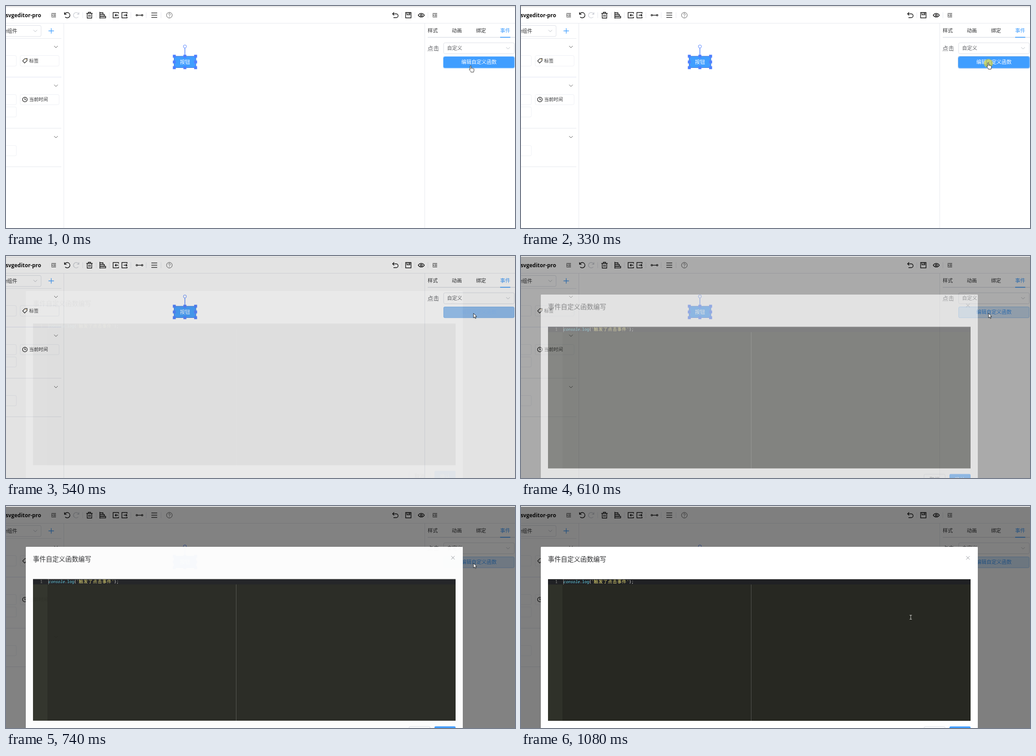
An HTML page for the animation above (1.85 s loop, 1131 by 495 pixels).

```html
<!DOCTYPE html>
<html lang="zh-CN">
<head>
<meta charset="utf-8">
<title>事件自定义函数编写</title>
<style>
html, body { margin: 0; width: 100%; height: 100%; overflow: hidden; background: #fff; }
svg { display: block; width: 1131px; height: 495px; }
text { font: 11.2px "Noto Sans CJK SC", "Noto Sans CJK", sans-serif; fill: #303133; white-space: pre; }
.small { font-size: 10.4px; }
.label { font-size: 12.8px; fill: #606266; }
.brand { font: bold 11.8px "Open Sans", sans-serif; fill: #111; }
.title { font-size: 14.4px; }
.mid { text-anchor: middle; }
.code { font: 8.7px "Noto Sans Mono", "DejaVu Sans Mono", monospace; fill: #f8f8f2; }
.code .fn { fill: #66d9ef; }
.code .str { fill: #e6db74; }
.code .cjk { font: 9.6px "Noto Sans CJK SC", "Noto Sans CJK", sans-serif; letter-spacing: .83px; }
.line { fill: none; stroke: #e6e8ee; }
.icon { fill: none; stroke: #111; stroke-width: 1.4; }
.thin { stroke: #555; stroke-width: 1; }
.pale { stroke: #c0c4cc; }

/* every change is a hard step */
.dialog, .panel, .btn, .btn-text, .ring, .click, .hand, .arrow, .beam {
  animation: 1850ms step-end infinite;
}
.dialog { animation-name: fade; }
.panel { animation-name: drop; }
.btn { fill: #409eff; stroke: #409eff; animation-name: btn; }
.btn-text { fill: #fff; animation-name: btn-text; }
.ring { fill: none; animation-name: ring; }
.click { animation-name: click; }
.hand { animation-name: hand; }
.arrow { animation-name: arrow; }
.beam { animation-name: beam; }

@keyframes fade {
  0% { opacity: 0; }
  29.189% { opacity: .22; }
  32.973% { opacity: .67; }
  36.216% { opacity: .9; }
  40% { opacity: .983; }
  43.784%, 100% { opacity: 1; }
}
@keyframes drop {
  0% { opacity: 0; transform: translateY(-16px); }
  29.189% { opacity: .22; transform: translateY(-12.5px); }
  32.973% { opacity: .66; transform: translateY(-5.4px); }
  36.216% { opacity: .9; transform: translateY(-1.6px); }
  40% { opacity: .983; transform: translateY(-.3px); }
  43.784%, 100% { opacity: 1; transform: none; }
}
@keyframes btn {
  0% { fill: #409eff; stroke: #409eff; }
  29.189% { fill: #96c3f3; stroke: #7db4ee; }
  32.973%, 100% { fill: #d9ecff; stroke: #a0cfff; }
}
@keyframes btn-text {
  0% { fill: #fff; }
  29.189% { fill: #90c1f6; }
  32.973%, 100% { fill: #409eff; }
}
@keyframes ring {
  0% { stroke: #a9d3ff; opacity: 1; }
  17.838% { stroke: #5f9fe6; }
  29.189%, 100% { opacity: 0; }
}
@keyframes click {
  0% { opacity: 0; }
  17.838% { opacity: .62; }
  25.405%, 100% { opacity: 0; }
}
@keyframes hand {
  0% { transform: translate(1028.5px, 132.5px); opacity: 1; }
  3.784% { transform: translate(1031px, 130px); }
  7.027% { transform: translate(1034px, 126px); }
  29.189%, 100% { transform: translate(1034px, 126px); opacity: 0; }
}
@keyframes arrow {
  0% { opacity: 0; }
  29.189% { opacity: 1; }
  50.811%, 100% { opacity: 0; }
}
@keyframes beam {
  0% { opacity: 0; transform: translate(960px, 185px); }
  50.811% { opacity: 1; transform: translate(960px, 185px); }
  54.595% { transform: translate(882px, 238px); }
  58.378%, 100% { opacity: 1; transform: translate(866px, 248px); }
}
</style>
</head>
<body>
<svg viewBox="0 0 1131 495">
  <defs>
    <path id="chev" d="M-4-2 0 2 4-2" fill="none"/>
    <path id="fold" d="M-5-4H5M-1-1.3H5M-1 1.3H5M-5 4H5M-5-2 -2.6 0 -5 2" fill="none" stroke="#222" stroke-width="1.1"/>
    <rect id="knob" x="-3.3" y="-3.3" width="6.6" height="6.6" fill="#4f80ff"/>
  </defs>

  <rect width="1131" height="495" fill="#fff"/>
  <rect width="1131" height="1" fill="#f7f7f7"/>
  <rect y="1" width="1131" height="1.4" fill="#d9d9d9"/>

  <!-- toolbar -->
  <text class="brand" x="78" y="24.5" text-anchor="end">svgeditor-pro</text>
  <use href="#fold" x="106" y="20.5"/>
  <use href="#fold" transform="translate(953 20.5)"/>
  <path class="line" d="M170.5 14V27M200.5 14V27M229.5 14V27M277.5 14V27M311.5 14V27M344.5 14V27M879.5 14V27M908.5 14V27M937.5 14V27"/>
  <g class="icon">
    <path d="M130 14V18.5H134.5M130.6 18A6 6 0 1 1 131.5 24.5"/>
    <path class="pale" stroke-width="1.1" d="M162 14V18.5H157.5M161.4 18A6 6 0 1 0 160.5 24.5"/>
    <path d="M178.5 16.5H192.5M183 16V14H188V16M180.5 17V27H190.5V17M184 19.5V24M187 19.5V24"/>
    <path d="M208.5 13V28M208.5 15H215.5V18.5H208.5M208.5 18.8H218.5V22.5H208.5M208.5 23H221.5V26.5H208.5"/>
    <path d="M250 17V14.5H238V26.5H250V24M250 20.5H242.5M245 18 242.5 20.5 245 23"/>
    <path d="M269 17V14.5H257.5V26.5H269V24M261.5 20.5H269M266.5 18 269 20.5 266.5 23"/>
    <path d="M292 20.5H301"/>
    <circle cx="290.6" cy="20.5" r="1.6"/>
    <circle cx="302.6" cy="20.5" r="1.6"/>
    <path stroke="#333" d="M323 15.5H336M323 20.5H336M323 25.5H336"/>
    <path d="M862.5 14 859 17.5 862.5 21M859 17.5H867A4 4 0 0 1 867 26H861"/>
    <path d="M888 14.5H900V26.5H888ZM891 14.5V19.5H897.5V14.5M895.3 15V18"/>
    <path d="M916 20.5C919.5 15 926 15 929.5 20.5C926 26 919.5 26 916 20.5Z"/>
    <circle cx="922.8" cy="20.5" r="2"/>
    <g class="thin">
      <circle cx="363" cy="20.5" r="6.3"/>
      <path d="M361 18.8C361 16 365.2 16.2 365 18.8C364.9 20.2 363 20.2 363 22M363 23.2V24.4"/>
    </g>
  </g>
  <path class="line" d="M0 38.5H1131M128.5 39V495M930.5 39V495"/>

  <!-- component list -->
  <rect class="line" x="-60" y="43.5" width="138" height="24.5" rx="3" style="stroke:#dcdfe6"/>
  <text x="2.6" y="59.7" text-anchor="start">组件</text>
  <text x="2.6" y="59.7" text-anchor="end">e</text>
  <use href="#chev" x="65" y="55.5" stroke="#b4b8c0"/>
  <path d="M94.5 55.5H106.5M100.5 49.5V61.5" stroke="#409eff" stroke-width="1.3"/>
  <path class="line" d="M0 72.5H123M0 272.5H123M0 358.5H123"/>
  <path d="M0 158.5H123" stroke="#dfe3f3"/>
  <g stroke="#555">
    <use href="#chev" x="111" y="91"/>
    <use href="#chev" x="111" y="177.5"/>
    <use href="#chev" x="111" y="292"/>
  </g>
  <g class="line" style="stroke:#eef0f5">
    <rect x="-60" y="110.5" width="83" height="23.5" rx="3"/>
    <rect x="31.5" y="110.5" width="86.5" height="23.5" rx="3"/>
    <rect x="-60" y="197.5" width="83" height="22.5" rx="3"/>
    <rect x="31.5" y="197.5" width="86.5" height="22.5" rx="3"/>
    <rect x="-60" y="225" width="83" height="22.5" rx="3"/>
    <rect x="-60" y="311" width="83" height="23" rx="3"/>
  </g>
  <path class="icon" style="stroke-width:1.1" d="M42 117.2 47 117 46.8 122 41.4 127.2 37 122.6Z"/>
  <circle cx="44.6" cy="119.5" r="1" fill="#e0a030"/>
  <text class="small" x="51.5" y="125.6">标签</text>
  <g class="icon" style="stroke-width:1.2">
    <circle cx="42" cy="208.5" r="5.2"/>
    <path d="M42 205V209H45"/>
  </g>
  <text class="small" x="51.5" y="212.4">当前时间</text>

  <!-- selected node -->
  <rect x="373.5" y="112" width="48.5" height="25.5" fill="#409eff" stroke="#3f74d8"/>
  <text class="mid" x="397.7" y="128.6" style="fill:#fff">按钮</text>
  <path d="M397.5 94V112" stroke="#4f80ff" stroke-width="1.5"/>
  <circle cx="397.5" cy="90.2" r="3.4" fill="#fff" stroke="#4f80ff"/>
  <use href="#knob" x="374" y="112"/>
  <use href="#knob" x="397.5" y="112"/>
  <use href="#knob" x="421.3" y="112"/>
  <use href="#knob" x="374" y="124.8"/>
  <use href="#knob" x="421.3" y="124.8"/>
  <use href="#knob" x="374" y="137.5"/>
  <use href="#knob" x="397.5" y="137.5"/>
  <use href="#knob" x="421.3" y="137.5"/>

  <!-- properties -->
  <text x="937" y="59.4">样式</text>
  <text x="990.6" y="59.4">动画</text>
  <text x="1044.4" y="59.4">绑定</text>
  <text x="1098" y="59.4" style="fill:#409eff">事件</text>
  <rect x="937" y="69" width="194" height="1.6" fill="#e0e3e9"/>
  <rect x="1098" y="68.8" width="22.5" height="1.8" fill="#409eff"/>
  <text class="label" x="936.6" y="98.8">点击</text>
  <rect class="line" x="972.5" y="82" width="157" height="24.5" rx="3" style="stroke:#dcdfe6"/>
  <text x="980" y="98.4" style="fill:#606266">自定义</text>
  <use href="#chev" x="1115.5" y="94" stroke="#b4b8c0"/>
  <rect class="ring" x="971.4" y="112.4" width="158.8" height="26.4" rx="3"/>
  <rect class="btn" x="972.5" y="113.5" width="156.6" height="24.2" rx="2.5"/>
  <text class="btn-text mid" x="1051" y="129.2">编辑自定义函数</text>

  <!-- dialog -->
  <g class="dialog">
    <rect y="2" width="1131" height="493" fill="#000" opacity=".5"/>
    <g class="panel">
      <rect x="44" y="91" width="971" height="440" rx="1.6" fill="#fff"/>
      <text class="title" x="59.8" y="124">事件自定义函数编写</text>
      <path d="M989.3 111.8 996.9 119.4M996.9 111.8 989.3 119.4" stroke="#909399"/>
      <rect x="60" y="163.5" width="939" height="315.5" fill="#272822"/>
      <rect x="60" y="163.5" width="32" height="315.5" fill="#2f3129"/>
      <rect x="60" y="163.5" width="939" height="11.5" fill="#202124"/>
      <path d="M511.5 175V479" stroke="#555651"/>
      <text class="code" x="76" y="172.4" style="fill:#8f908a">1</text>
      <path d="M94.5 164V175" stroke="#a8a8a2" stroke-width=".8"/>
      <text class="code" x="94" y="172.4"><tspan class="fn" font-style="italic">console</tspan>.<tspan class="fn">log</tspan>(<tspan class="str">'<tspan class="cjk">触发了点击事件</tspan>'</tspan>);</text>
      <rect x="895.5" y="492" width="47" height="25" rx="3" fill="#fff" stroke="#dcdfe6"/>
      <text class="mid" x="919" y="508.4" style="fill:#606266">取消</text>
      <rect x="952" y="491.6" width="47" height="25.6" rx="3" fill="#409eff"/>
      <text class="mid" x="975.5" y="508.4" style="fill:#fff">确认</text>
    </g>
  </g>

  <!-- pointers -->
  <circle class="click" cx="1038.5" cy="128" r="10" fill="#e8d820"/>
  <path class="hand" fill="#fff" stroke="#111" stroke-width=".9" stroke-linejoin="round"
    d="M2.8 9V1.8a1.2 1.2 0 0 1 2.4 0V6.6c.3-.7 2-.6 2.2.4 .4-.7 2-.5 2.1.5 .5-.6 1.9-.3 1.9.8V11c0 1.5-1 2.2-1 4H4.8c0-1.5-2.4-3.4-3.8-5.6 -.6-1.1.9-2 1.8-.4z"/>
  <g class="arrow">
    <path transform="translate(1038.8 127.8)" fill="#fff" stroke="#111" stroke-width=".9" d="M0 0V10.2L2.3 8 4 11.7 5.6 11 4 7.3H7.2Z"/>
  </g>
  <path class="beam" fill="none" stroke="#d8d8d4" d="M-2.5-4.5H2.5M0-4.5V4.5M-2.5 4.5H2.5"/>
</svg>
</body>
</html>
```
